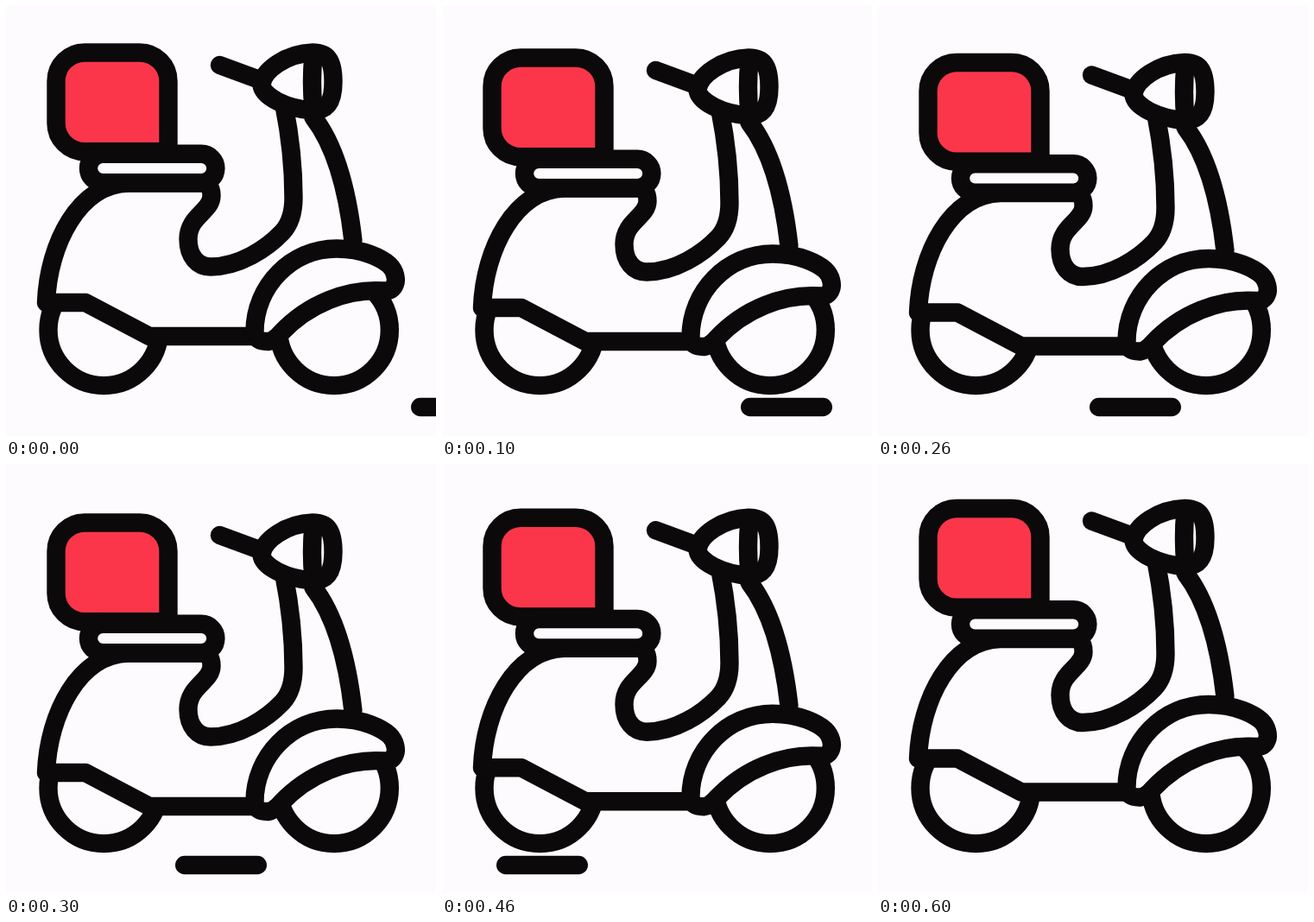
Recreate the animation shown at these times as an HTML page. Size 498 px wide and 498 px high, loop 0.7 s.

```html
<!DOCTYPE html>
<html lang="en">
<head>
<meta charset="utf-8">
<title>Delivery scooter</title>
<style>
  html, body { margin: 0; width: 100%; height: 100%; overflow: hidden; background: #fdfbfe; }
  svg { display: block; width: 100vw; height: 100vh; }
  .ink { fill: none; stroke: #0b090a; stroke-width: 21.4; stroke-linecap: round; stroke-linejoin: round; }
  .solid { fill: #fdfbfe; }
  .box { fill: #fb364b; stroke-linejoin: miter; }
</style>
</head>
<body>
<svg viewBox="0 0 498 498">
  <g class="ink">
    <circle cx="113.3" cy="375.3" r="64.3"/>
    <circle cx="380" cy="375.3" r="64.3"/>
    <path id="road" d="M10.7 464.5h84.6"/>

    <g id="scooter">
      <!-- body and front shield -->
      <path class="solid" d="M322 115C329 150 333 185 333 222Q333 248 320 262C302 281 270 302 237 302
        C222 302 211 290 211 270C211 243 238 238 238 220Q238 205 226 205H142
        C85 206 49 275 46.5 343.5H92L166 382.5H291"/>
      <path d="M356 129C380 160 395 210 402 272"/>

      <!-- front fender -->
      <path class="solid" d="M288 377C288 325 330 281 383 281C415 281 436 293 444 300
        C451 307 452.5 317 450.5 322Q447.500 330.500 438 330C395 327 350 345 318 379
        Q310 388 304 388.500Q288 389 288 377Z"/>

      <!-- cargo box and seat -->
      <path class="box" d="M188 168.700V87A33 33 0 0 0 155 54H91A33 33 0 0 0 58 87V135.700A33 33 0 0 0 91 168.700Z"/>
      <rect class="solid" x="95.500" y="171.300" width="147.400" height="33.400" rx="16.700"/>

      <!-- handlebar and headlight -->
      <path d="M247.500 68.500L295 86"/>
      <path class="solid" d="M296 91C298 74 325 55 355 54C372 54 379 62 379 88
        C379 110 373 121 355 121C325 119 297 105 296 91Z"/>
      <path d="M356 57Q353 88 356 119"/>
    </g>
  </g>
</svg>
<script>
  const STEP = 100;
  // One pose per step: scooter drop and left end of the road dash.
  const poses = [
    [0, 469], [6, 346], [11.5, 245], [14, 196], [8.2, 63], [3.2, -55], [-2.5, -170]
  ];
  const scooter = document.getElementById('scooter');
  const road = document.getElementById('road');
  const start = performance.now();

  function draw(now) {
    const step = Math.floor(Math.max(0, now - start) / STEP) % poses.length;
    const [drop, left] = poses[step];
    scooter.setAttribute('transform', `translate(0 ${drop})`);
    road.setAttribute('transform', `translate(${left} 0)`);
    requestAnimationFrame(draw);
  }
  draw(start);
</script>
</body>
</html>
```
